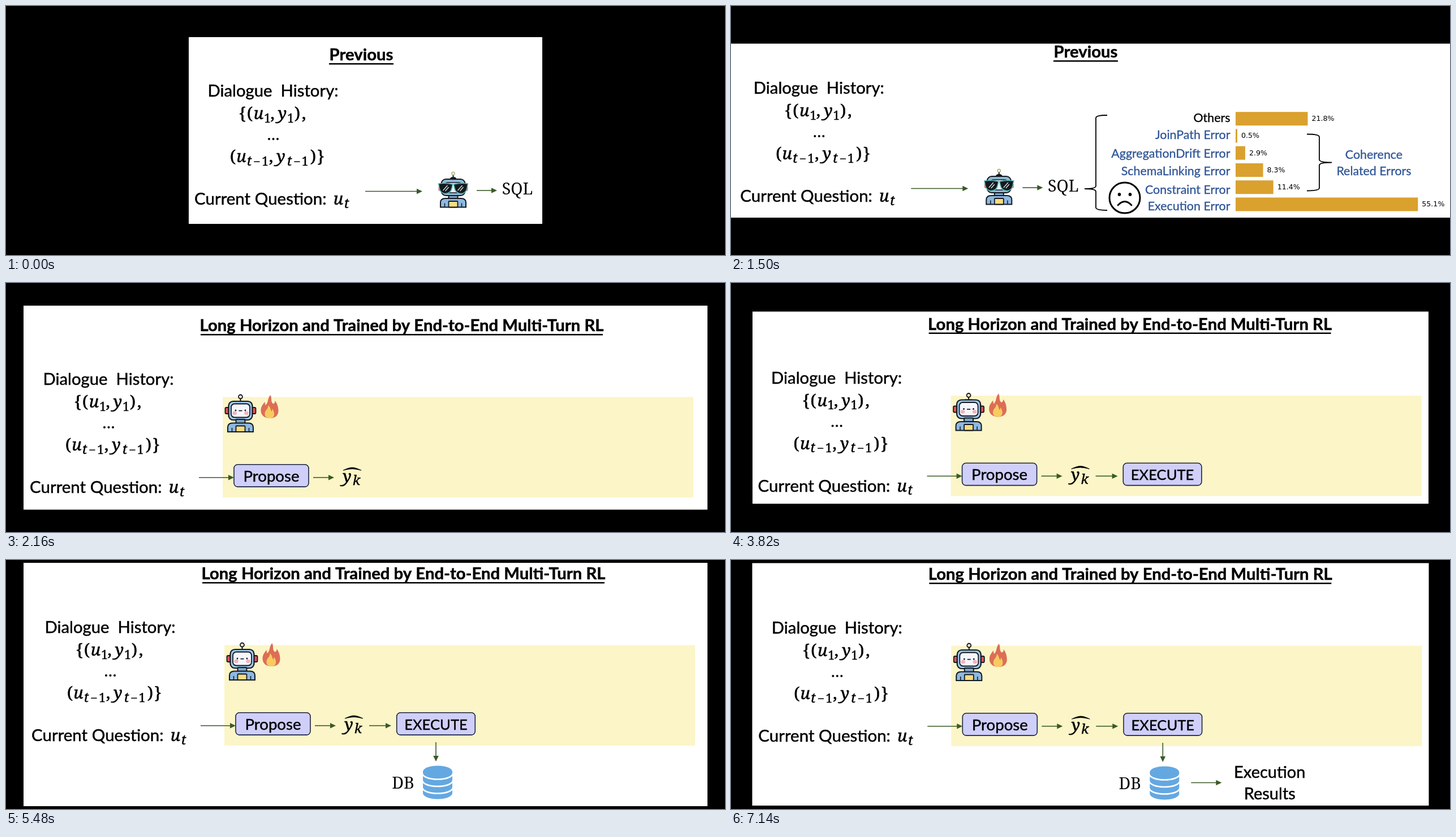
Animation, 1271 px wide and 440 px high, one loop 8 s. Source, as an HTML page with a canvas:

```html
<!DOCTYPE html>
<html lang="en">
<head>
<meta charset="utf-8">
<title>Dialogue to SQL</title>
<style>
  html, body { margin: 0; width: 100%; height: 100%; overflow: hidden; background: #000; }
  canvas { display: block; width: 1271px; height: 440px; }
</style>
</head>
<body>
<canvas id="stage"></canvas>
<script>
const W = 1271, H = 440, LOOP = 8000;
const INK = '#000', LINE = '#14181f', GREEN = '#3a5a26', BLUE = '#2f5597', GOLD = '#daa12f';
const SANS = 'Lato, Carlito, sans-serif', SERIF = '"Noto Serif", serif';
const canvas = document.getElementById('stage');
const ctx = canvas.getContext('2d');
const dpr = window.devicePixelRatio || 1;
canvas.width = W * dpr;
canvas.height = H * dpr;

// A thin outline gives the letters a slightly heavier weight.
function text(s, x, y, size, { align = 'left', color = INK, style = '', family = SANS, heavy = 0.016 } = {}) {
  ctx.font = `${style} ${size}px ${family}`;
  ctx.textAlign = align;
  ctx.fillStyle = color;
  ctx.fillText(s, x, y);
  if (!heavy) return;
  ctx.strokeStyle = color;
  ctx.lineWidth = size * heavy;
  ctx.lineJoin = 'round';
  ctx.strokeText(s, x, y);
  ctx.lineJoin = 'miter';
}

function rect(x, y, w, h, color) {
  ctx.fillStyle = color;
  ctx.fillRect(x, y, w, h);
}

function paint(fill, stroke, width) {
  if (fill) { ctx.fillStyle = fill; ctx.fill(); }
  if (stroke) { ctx.strokeStyle = stroke; ctx.lineWidth = width; ctx.stroke(); }
}

function round(x, y, w, h, r, fill, stroke, width = 2) {
  ctx.beginPath();
  ctx.roundRect(x, y, w, h, r);
  paint(fill, stroke, width);
}

function oval(x, y, rx, ry, fill, stroke, width = 2) {
  ctx.beginPath();
  ctx.ellipse(x, y, rx, ry, 0, 0, Math.PI * 2);
  paint(fill, stroke, width);
}

function shape(d, fill, stroke, width) {
  const p = new Path2D(d);
  if (fill) { ctx.fillStyle = fill; ctx.fill(p); }
  if (stroke) { ctx.strokeStyle = stroke; ctx.lineWidth = width; ctx.stroke(p); }
}

function at(x, y, draw) {
  ctx.save();
  ctx.translate(x, y);
  draw();
  ctx.restore();
}

function arrow(x, y, length, down = false) {
  at(x, y, () => {
    if (down) ctx.rotate(Math.PI / 2);
    shape(`M0 0H${length - 8}`, null, GREEN, 1.6);
    shape(`M${length} 0l-10 -4.8v9.6z`, GREEN);
  });
}

// Math glyphs are centred on x; the kind sets size and drop below the baseline.
const KINDS = {
  var: { size: 29, drop: 0, style: 'italic' },
  sub: { size: 21, drop: 5.5, style: '' },
  subvar: { size: 23.5, drop: 5.5, style: 'italic' },
  fence: { size: 29, drop: 0, style: '' }
};

function math(y, glyphs) {
  for (const [s, x, kind] of glyphs) {
    const { size, drop, style } = KINDS[kind];
    text(s, x, y + drop, size, { align: 'center', style, family: SERIF, heavy: 0.02 });
  }
}

function heading(s, cx, y, width) {
  text(s, cx, y, 29.3, { align: 'center', style: 'bold' });
  rect(cx - width / 2, y + 5, width, 2.5, INK);
}

function dialogue() {
  text('Dialogue  History:', 356.5, 160, 29.3);
  math(200, [['{', 418, 'fence'], ['(', 431, 'fence'], ['u', 446.5, 'var'], ['1', 462, 'sub'],
    [',', 471, 'fence'], ['y', 488.5, 'var'], ['1', 503, 'sub'], [')', 515, 'fence'], [',', 526.5, 'fence']]);
  for (const x of [465, 472.5, 480]) oval(x, 235, 2, 2, INK);
  math(276, [['(', 401, 'fence'], ['u', 416, 'var'], ['t', 430, 'subvar'], ['−', 443.5, 'sub'],
    ['1', 458, 'sub'], [',', 468.5, 'fence'], ['y', 486, 'var'], ['t', 501, 'subvar'],
    ['−', 514.5, 'sub'], ['1', 528.5, 'sub'], [')', 543, 'fence'], ['}', 556.5, 'fence']]);
  text('Current Question:', 333, 351, 29.5);
  math(351, [['u', 587.5, 'var'], ['t', 602, 'subvar']]);
}

function robotBody() {
  round(-8, 40, 16, 8, 1, '#7fa6cc', LINE, 2);
  shape('M-22.5 62V54Q-22.5 46.5 -14 46.5H14Q22.5 46.5 22.5 54V62Z', '#8db9e2', LINE, 2);
  shape('M-15 62V55M15 62V55', null, LINE, 1.5);
  round(-8, 51.5, 16, 10.5, 1, '#f9dc80', LINE, 1.8);
}

// The origin is the centre of the antenna ball.
function robot() {
  shape('M0 3V8M-7 8H7', null, LINE, 2);
  oval(0, 0, 3.5, 3.5, '#fdf3c0', LINE, 1.8);
  round(-27, 19, 7, 11, 2, '#dc5460', LINE, 1.8);
  round(20, 19, 7, 11, 2, '#dc5460', LINE, 1.8);
  round(-21, 8, 42, 33, 8, '#9cc8ee', LINE, 2.2);
  round(-16.5, 12.5, 33, 24, 6, '#f6f7fc', LINE, 1.8);
  for (const side of [-1, 1]) {
    oval(side * 10.5, 29, 3.8, 3.3, '#f3b3c0');
    oval(side * 8.5, 24, 1.4, 1.6, LINE);
  }
  rect(-3, 23.8, 6, 1.7, LINE);
  robotBody();
}

function coolRobot() {
  at(0, -2.5, robotBody);
  shape('M0 3V8', null, LINE, 2);
  oval(0, 0, 2.8, 2.8, '#fbf3c0', '#8d8560', 1);
  shape('M-6 11Q-6 6 0 6Q6 6 6 11Z', LINE);
  round(-21, 10, 42, 29, 8, '#8fb9d8', LINE, 2);
  round(-15, 16, 30, 18, 5, '#eef1f4', LINE, 1.5);
  for (const side of [-1, 1]) {
    at(0, 0, () => {
      ctx.scale(side, 1);
      round(22, 22, 4, 9, 2, '#e0777c');
      shape('M1 19Q14 16 26 18L25 22Q24 35 14 35.5Q4 35.5 2 24Z', '#15191e', '#53b9b6', 1.5);
    });
    shape(`M${side * 13 - 5} 30l8 -9M${side * 13 - 1} 31l6 -7`, null, '#dce5e8', 1.3);
  }
}

function flame() {
  shape('M17 0C20 6 17 10 21 15C24 16 25 13 25 10C30 16 31 23 31 28C31 37 24 41 16 41C7 41 0 36 0 27C0 20 4 16 7 12L8 18C14 14 11 6 17 0Z', '#dc6e55');
  shape('M13 18C17 21 17 26 19 29C20 28 20 26 20 24C25 30 26 41 16 41C5 41 6 31 9 27C12 24 13 21 13 18Z', '#f7cb60');
}

function database() {
  shape('M0 11A26 10.5 0 0 1 52 11V49A26 10.5 0 0 1 0 49Z', '#64a8e2');
  for (const y of [14, 26.5, 39]) shape(`M-1 ${y}A27 10.5 0 0 0 53 ${y}`, null, '#fff', 2.6);
}

function button(s, x, w, size) {
  round(x, 320.8, w, 39.3, 6.5, '#cfcffa', '#1b2440', 1.6);
  text(s, x + w / 2, 350.5, size, { align: 'center' });
}

// A brace from (x, top) to (x, bottom) with its point at (tip, mid).
function brace(x, top, bottom, tip, mid) {
  const s = (x + tip) / 2, r = 5;
  shape(`M${x} ${top}Q${s} ${top} ${s} ${top + r}V${mid - r}Q${s} ${mid} ${tip} ${mid}` +
    `Q${s} ${mid} ${s} ${mid + r}V${bottom - r}Q${s} ${bottom} ${x} ${bottom}`, null, INK, 1.8);
}

function sadFace() {
  oval(696, 339, 27, 27, '#fff', INK, 3);
  oval(686.5, 333, 2.8, 3, INK);
  oval(705.5, 333, 2.8, 3, INK);
  ctx.lineCap = 'round';
  shape('M684 352Q696 339 708 352', null, INK, 2.8);
  ctx.lineCap = 'butt';
}

const ERRORS = [
  ['Others', 21.8, 205], ['JoinPath Error', 0.5, 235], ['AggregationDrift Error', 2.9, 267.5],
  ['SchemaLinking Error', 8.3, 298.5], ['Constraint Error', 11.4, 331.5], ['Execution Error', 55.1, 361]
];

function errorChart() {
  brace(665, 193, 361, 625, 323);
  ERRORS.forEach(([label, value, y], i) => {
    const top = 187.2 + i * 30.25, width = value * 5.85;
    text(label, 882.5, y, 21.4, { align: 'right', color: i ? BLUE : INK });
    rect(892, top, width, 24, GOLD);
    text(value.toFixed(1) + '%', 892 + width + 7, top + 15.8, 12.6,
      { family: '"DejaVu Sans", sans-serif', heavy: 0 });
  });
  sadFace();
  brace(1018, 226.5, 326.5, 1062, 276.5);
  text('Coherence', 1136.5, 269.5, 21.4, { align: 'center', color: BLUE });
  text('Related Errors', 1136.5, 299, 21.4, { align: 'center', color: BLUE });
}

function previous() {
  dialogue();
  arrow(635, 327.5, 101);
  at(790.5, 296, coolRobot);
  arrow(832, 326, 36);
  text('SQL', 904, 333, 28.5, { align: 'center', family: SERIF, heavy: 0 });
}

function agent(step) {
  heading('Long Horizon and Trained by End-to-End Multi-Turn RL', 699.5, 85, 711);
  at(-291, 20, dialogue);
  rect(383, 201.5, 832, 177.5, '#fcf5c7');
  at(414.5, 201, robot);
  at(450.5, 198, flame);
  arrow(341, 343.7, 62);
  button('Propose', 403, 132, 27.6);
  arrow(543, 343.7, 37);
  math(351.5, [['y', 603, 'var'], ['k', 619.5, 'subvar']]);
  shape('M596 331Q606 326 612 326Q618 326 628 331Q618 328.5 612 328.5Q606 328.5 596 331Z', INK, INK, 0.8);
  if (step < 1) return;
  arrow(639, 343.7, 39);
  button('EXECUTE', 687.7, 138.6, 25.6);
  if (step < 2) return;
  arrow(757, 373, 34, true);
  text('DB', 699, 455, 28.5, { align: 'center', family: SERIF, heavy: 0 });
  at(734, 414, database);
  if (step < 3) return;
  arrow(807, 443.5, 54);
  text('Execution', 946, 434.5, 29, { align: 'center' });
  text('Results', 946, 473, 29, { align: 'center' });
}

// Each scene: start time, white panel, contents.
const SCENES = [
  [0, [323, 55, 625, 330], () => { heading('Previous', 628, 96, 114); previous(); }],
  [500, [0, 66.5, 1271, 307.5], () => {
    heading('Previous', 627, 91, 114);
    at(-316.7, -5, previous);
    errorChart();
  }],
  [2160, [31, 40, 1209, 360.5], () => agent(0)],
  [3820, [38, 50.5, 1195, 339.5], () => at(5.6, -2.5, () => agent(1))],
  [5480, [31, 5, 1209, 430], () => at(3, -51, () => agent(2))],
  [7140, [37.5, 5.5, 1196, 428.5], () => at(6.3, -50, () => agent(3))]
];

let shown = null;

function frame() {
  const t = performance.now() % LOOP;
  const scene = SCENES.findLast(([start]) => t >= start);
  if (scene !== shown) {
    shown = scene;
    ctx.setTransform(dpr, 0, 0, dpr, 0, 0);
    rect(0, 0, W, H, '#000');
    rect(...scene[1], '#fff');
    scene[2]();
  }
  requestAnimationFrame(frame);
}
requestAnimationFrame(frame);
</script>
</body>
</html>
```
